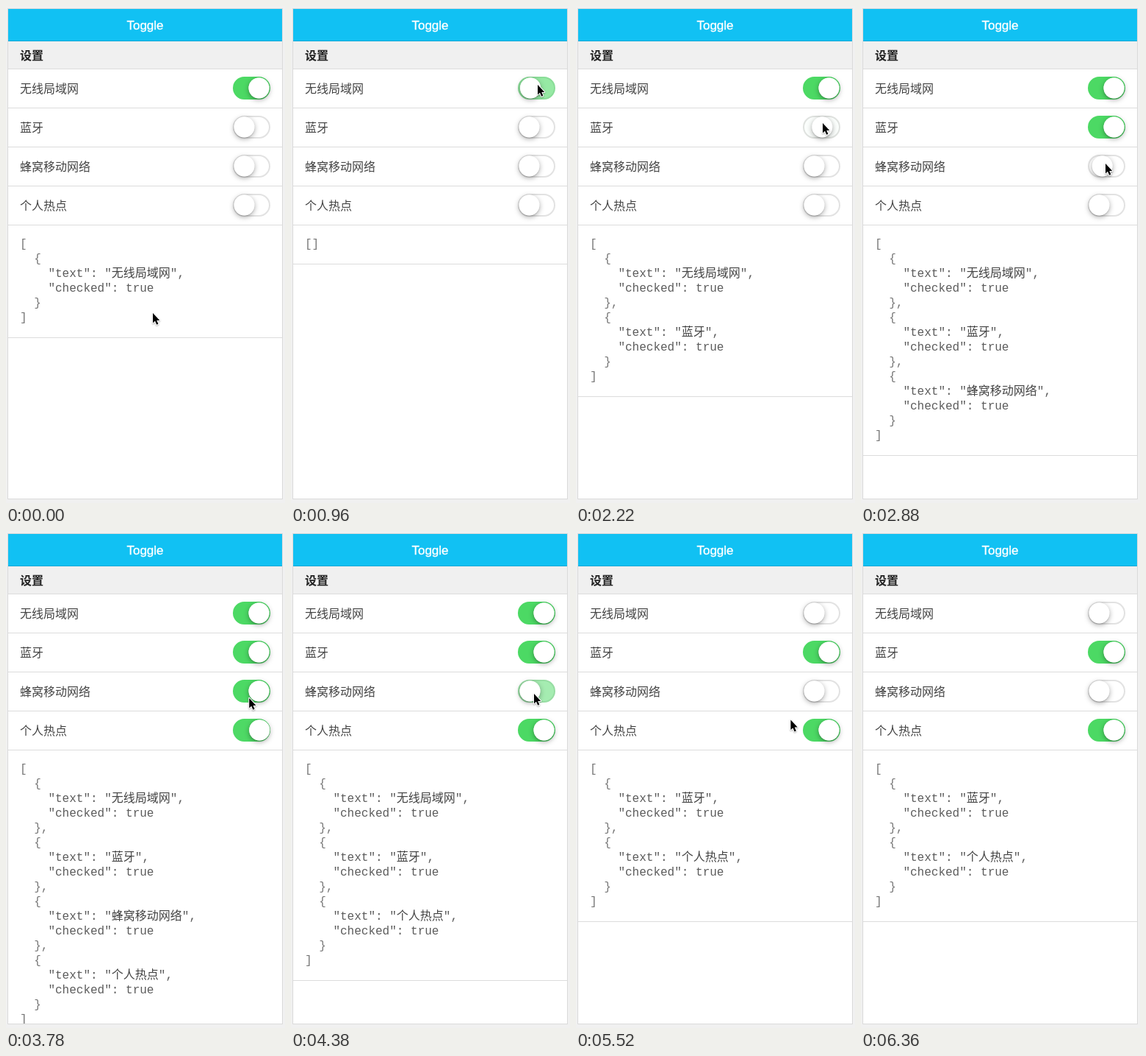
An HTML page with a canvas for the animation above (6420 ms loop, 380 by 675 pixels).

```html
<!DOCTYPE html>
<html lang="zh-CN">
<head>
<meta charset="utf-8">
<title>Toggle</title>
<style>
  html, body { margin: 0; width: 100%; height: 100%; overflow: hidden; background: #f0f0f0; }
  canvas { display: block; width: 380px; height: 675px; }
</style>
</head>
<body>
<canvas id="stage"></canvas>
<script>
const W = 380, H = 675, LOOP = 6420, STEP = 60, FADE = 300;
const canvas = document.getElementById('stage');
const dpr = window.devicePixelRatio || 1;
canvas.width = W * dpr;
canvas.height = H * dpr;
const ctx = canvas.getContext('2d');

const SANS = '"Liberation Sans", Arial, sans-serif';
const CJK = '"Noto Sans CJK SC", "Noto Sans CJK", sans-serif';
const MONO = '"Liberation Mono", "Courier New", monospace';
const LEFT = 3, RIGHT = 376, BOTTOM = 669, ROW = 53, LIST_TOP = 85;

const labels = ['无线局域网', '蓝牙', '蜂窝移动网络', '个人热点'];
const initial = [1, 0, 0, 0];
// [time, row]
const taps = [[825, 0], [1545, 0], [2188, 1], [2876, 2], [3500, 3], [4230, 2], [4995, 0]];
// [time, x, y]
const path = [
  [30, 200, 417], [660, 336, 107], [1740, 336, 107], [2040, 336, 159],
  [2340, 336, 159], [2760, 333, 214], [3060, 333, 214], [3420, 333, 268],
  [3570, 333, 268], [3840, 331, 221], [4440, 331, 221], [4860, 336, 124],
  [5300, 336, 124], [6000, 150, 690]
];

function bezier(x1, y1, x2, y2) {
  const at = (a, b, s) => 3 * a * s * (1 - s) ** 2 + 3 * b * s * s * (1 - s) + s ** 3;
  return x => {
    if (x <= 0) return 0;
    if (x >= 1) return 1;
    let lo = 0, hi = 1;
    for (let i = 0; i < 24; i++) {
      const mid = (lo + hi) / 2;
      if (at(x1, x2, mid) < x) lo = mid; else hi = mid;
    }
    return at(y1, y2, lo);
  };
}
const slide = bezier(0, 1.1, 1, 1.1);
const fade = bezier(0.42, 0, 0.58, 1);

function toggleState(row, t) {
  let on = initial[row], start = -FADE;
  for (const [time, r] of taps) {
    if (r === row && time <= t) { on = 1 - on; start = time; }
  }
  const p = (t - start) / FADE;
  const toward = v => on ? v : 1 - v;
  return { on, pos: toward(slide(p)), tint: toward(fade(p)) };
}

function cursorAt(t) {
  if (t <= path[0][0]) return path[0].slice(1);
  for (let i = 1; i < path.length; i++) {
    const [t0, x0, y0] = path[i - 1], [t1, x1, y1] = path[i];
    if (t < t1) {
      const p = (t - t0) / (t1 - t0), e = p * p * (3 - 2 * p);
      return [x0 + (x1 - x0) * e, y0 + (y1 - y0) * e];
    }
  }
  return null;
}

function rect(x, y, w, h, color) {
  ctx.fillStyle = color;
  ctx.fillRect(x, y, w, h);
}

function text(str, x, y, font, color) {
  ctx.font = font;
  ctx.fillStyle = color;
  ctx.fillText(str, x, y);
}

function mix(a, b, p) {
  return 'rgb(' + a.map((v, i) => Math.round(v + (b[i] - v) * p)).join(',') + ')';
}

function shadow(color, blur, dy) {
  ctx.shadowColor = color;
  ctx.shadowBlur = blur * dpr;
  ctx.shadowOffsetY = dy * dpr;
}

function drawToggle(y, { pos, tint }) {
  const green = [76, 217, 100];
  ctx.beginPath();
  ctx.roundRect(310, y + 1, 49, 29, 14.5);
  ctx.fillStyle = mix([255, 255, 255], green, tint);
  ctx.fill();
  ctx.lineWidth = 2;
  ctx.strokeStyle = mix([226, 226, 226], green, tint);
  ctx.stroke();

  ctx.save();
  ctx.beginPath();
  ctx.arc(324.5 + 20 * pos, y + 15.5, 14, 0, Math.PI * 2);
  ctx.fillStyle = '#fff';
  shadow('rgba(0,0,0,.35)', 7, 2);
  ctx.fill();
  shadow('rgba(0,0,0,.15)', 1, 1);
  ctx.fill();
  ctx.restore();
}

function jsonLines(items) {
  if (!items.length) return ['[]'];
  return JSON.stringify(items, null, 2).split('\n');
}

function drawLine(line, y) {
  let x = 19;
  for (const part of line.match(/[\u4e00-\u9fff]+|[^\u4e00-\u9fff]+/g)) {
    const wide = part > '\u4e00';
    const bracket = /^[\s[\]{},]+$/.test(part) && !/^",?$/.test(part);
    text(part, x, y, '16px ' + (wide ? CJK : MONO), wide ? '#444' : bracket ? '#777' : '#5c5c5c');
    x += ctx.measureText(part).width;
  }
}

function drawCursor([x, y]) {
  ctx.save();
  ctx.translate(x, y);
  ctx.beginPath();
  [[0, 0], [0, 13.5], [3, 10.8], [5.2, 15.8], [7.4, 14.8], [5.3, 10], [9.3, 10]]
    .forEach(p => ctx.lineTo(...p));
  ctx.closePath();
  ctx.lineJoin = 'round';
  ctx.lineWidth = 2;
  ctx.strokeStyle = '#fff';
  shadow('rgba(0,0,0,.3)', 2, 1);
  ctx.stroke();
  shadow('transparent', 0, 0);
  ctx.fillStyle = '#000';
  ctx.fill();
  ctx.restore();
}

function draw(t) {
  ctx.setTransform(dpr, 0, 0, dpr, 0, 0);
  rect(0, 0, W, H, '#f0f0f0');
  rect(LEFT - 1, 3, RIGHT - LEFT + 2, BOTTOM - 2, '#dadada');
  rect(LEFT, 4, RIGHT - LEFT, BOTTOM - 4, '#fff');

  ctx.save();
  ctx.beginPath();
  ctx.rect(LEFT, 4, RIGHT - LEFT, BOTTOM - 4);
  ctx.clip();
  const line = y => rect(LEFT, y, RIGHT - LEFT, 1, '#dcdcdc');

  rect(LEFT, 4, RIGHT - LEFT, 44, '#11c1f3');
  rect(LEFT, 47, RIGHT - LEFT, 1, '#0fa8d6');
  ctx.textAlign = 'center';
  text('Toggle', 189.5, 32, '17px ' + SANS, '#fff');
  ctx.lineWidth = 0.35;
  ctx.strokeStyle = '#fff';
  ctx.strokeText('Toggle', 189.5, 32);
  ctx.textAlign = 'left';

  rect(LEFT, 48, RIGHT - LEFT, 37, '#f0f0f0');
  text('设置', 19, 73, 'bold 16px ' + CJK, '#222');
  line(LIST_TOP);

  const items = [];
  labels.forEach((label, i) => {
    const y = LIST_TOP + i * ROW, state = toggleState(i, t);
    text(label, 19, y + 33, '16px ' + CJK, '#444');
    line(y + ROW);
    drawToggle(y + 11, state);
    if (state.on) items.push({ text: label, checked: true });
  });

  const lines = jsonLines(items);
  lines.forEach((str, i) => drawLine(str, 328 + i * 20));
  line(330 + lines.length * 20);
  ctx.restore();

  const at = cursorAt(t);
  if (at) drawCursor(at);
}

const begin = performance.now();
function tick() {
  const t = (performance.now() - begin) % LOOP;
  draw(Math.floor(t / STEP) * STEP);
  requestAnimationFrame(tick);
}
tick();
</script>
</body>
</html>
```
